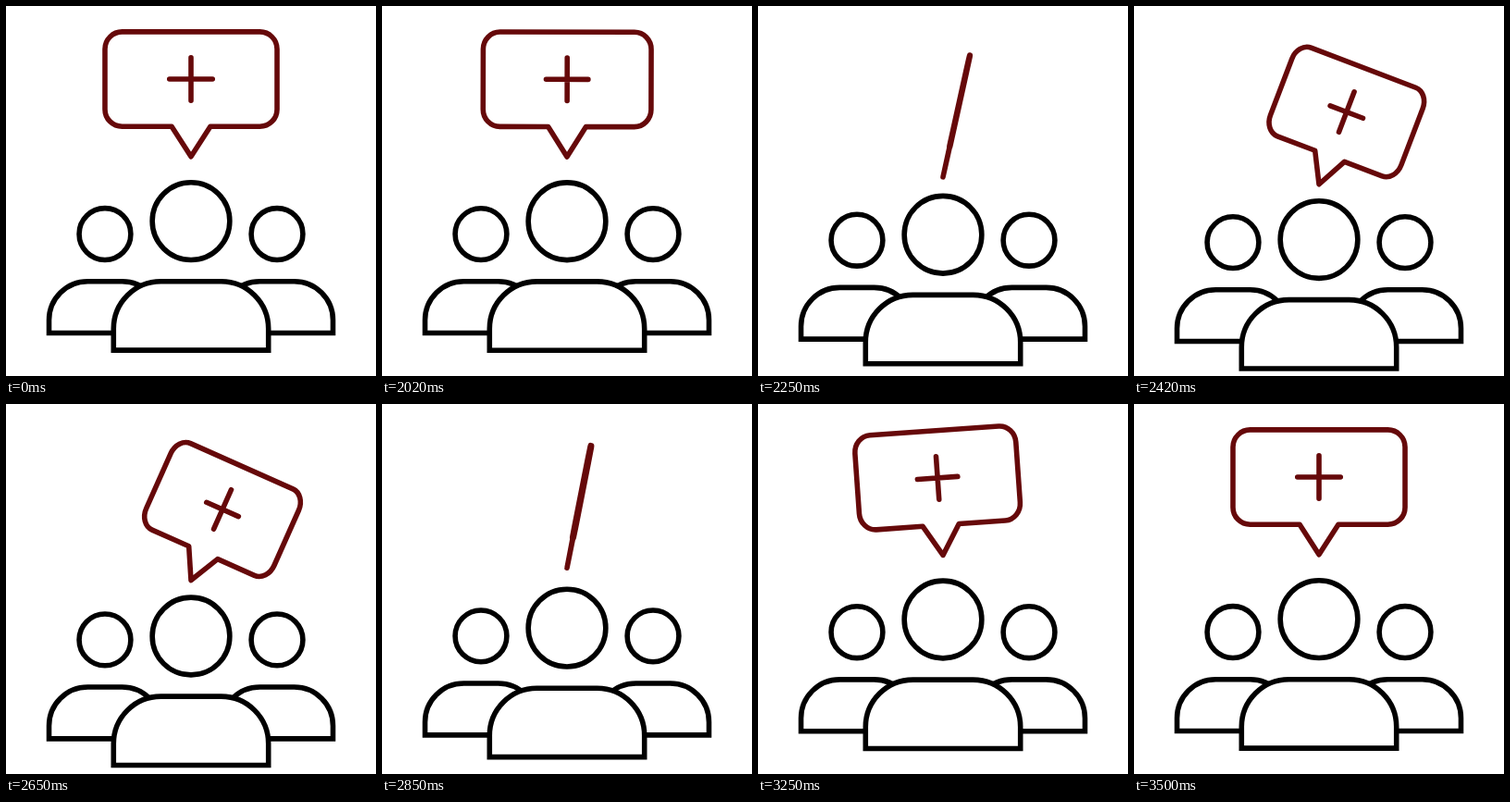
An HTML page that plays this animation: 400 px wide and 400 px high, repeating every 3520 ms.

```html
<!DOCTYPE html>
<html lang="en">
<head>
<meta charset="utf-8">
<title>Group with speech bubble</title>
<style>
  html, body { margin: 0; height: 100%; overflow: hidden; background: #fff; }
  svg { display: block; width: 100%; height: 100%; }
  path, circle { fill: #fff; stroke: #000; stroke-width: 6; }
  #bubble path { fill: none; stroke: #66090a; stroke-linecap: round; stroke-linejoin: round; }
</style>
</head>
<body>
<svg viewBox="0 0 430 430">
  <g id="sides">
    <circle cx="115" cy="265" r="30"/>
    <circle cx="315" cy="265" r="30"/>
    <path d="M50 380V365a45 45 0 0 1 45-45h40a45 45 0 0 1 45 45v15z"/>
    <path d="M250 380V365a45 45 0 0 1 45-45h40a45 45 0 0 1 45 45v15z"/>
  </g>
  <g id="front">
    <circle cx="215" cy="250" r="45"/>
    <path d="M125 400V375a55 55 0 0 1 55-55h70a55 55 0 0 1 55 55v25z"/>
  </g>
  <g id="bubble"><path id="outline"/></g>
</svg>
<script>
const LOOP = 3520, START = 1995;
const [sides, front, bubble, outline] =
  ['sides', 'front', 'bubble', 'outline'].map(id => document.getElementById(id));

// Cubic bezier easing (a, 0, b, 1)
function ease(p, a, b) {
  let lo = 0, hi = 1;
  for (let i = 0; i < 24; i++) {
    const t = (lo + hi) / 2, q = 1 - t;
    if (3 * q * q * t * a + 3 * q * t * t * b + t ** 3 < p) lo = t; else hi = t;
  }
  return lo * lo * (3 - 2 * lo);
}

// Each key is [time, value, a, b]; the easing leads into that key
function track(time, keys) {
  if (time <= keys[0][0]) return keys[0][1];
  for (let i = 1; i < keys.length; i++) {
    const [t0, v0] = keys[i - 1], [t1, v1, a, b] = keys[i];
    if (time < t1) return v0 + (v1 - v0) * ease((time - t0) / (t1 - t0), a, b);
  }
  return keys[keys.length - 1][1];
}

const DROP = [[0, 0], [513, 1, .33, .33], [1395, 0, .33, .33]];
const TILT = [[0, 0], [670, 24, .33, .33], [1085, -6.4, .33, .67], [1500, 0, .33, .67]];
const TURN = [[0, 1], [510, -1, .25, .75], [1433, 1, .33, .33]];

// Bubble and plus, with the tip of the tail at the origin
function bubblePath(turn) {
  const s = Math.max(Math.abs(turn), .001);
  const x = v => (v * s).toFixed(3);
  const corner = (dx, dy) => `a${x(20)} 20 0 0 1 ${x(dx)} ${dy}`;
  return `M0 0L${x(-22.5)} -35H${x(-80)}${corner(-20, -20)}V-125${corner(20, -20)}` +
    `H${x(80)}${corner(20, 20)}V-55${corner(-20, 20)}H${x(22.5)}z` +
    `M0 -115V-65M${x(-25)} -90H${x(25)}`;
}

function draw(now) {
  const time = now % LOOP - START;
  const drop = track(time, DROP);
  sides.setAttribute('transform', `translate(0 ${10 * drop})`);
  front.setAttribute('transform', `translate(0 ${22 * drop})`);
  bubble.setAttribute('transform',
    `translate(215 ${175 + 33 * drop}) rotate(${track(time, TILT)})`);
  outline.setAttribute('d', bubblePath(track(time, TURN)));
  requestAnimationFrame(draw);
}
draw(0);
</script>
</body>
</html>
```
